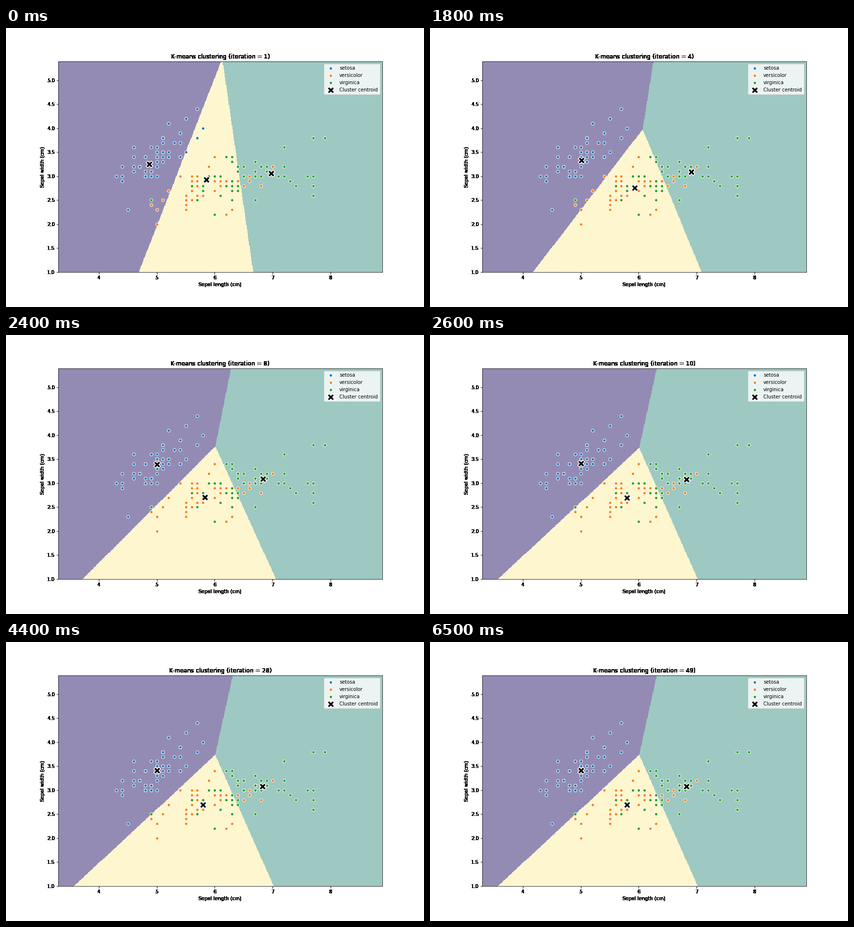
Recreate the animation shown at these times as a matplotlib script. Size 864x576 px, loop 6600 ms.

```python
import numpy as np
import matplotlib.pyplot as plt
from matplotlib.animation import FuncAnimation

# Flower measurements in tenths of a cm: sepal length -> sepal widths
SETOSA = {
    43: [30], 44: [29, 30, 32], 45: [23], 46: [31, 34, 36, 32], 47: [32, 32],
    48: [34, 30, 34, 31, 30], 49: [30, 31, 31, 36],
    50: [36, 34, 30, 34, 32, 35, 35, 33], 51: [35, 35, 38, 37, 33, 34, 38, 38],
    52: [35, 34, 41], 53: [37], 54: [39, 37, 39, 34, 34], 55: [42, 35],
    57: [44, 38], 58: [40],
}
VERSICOLOR = {
    49: [24], 50: [20, 23], 51: [25], 52: [27], 54: [30],
    55: [23, 24, 24, 25, 26], 56: [29, 30, 25, 30, 27],
    57: [28, 26, 30, 29, 28], 58: [27, 27, 26], 59: [30, 32],
    60: [22, 29, 27, 34], 61: [29, 28, 28, 30], 62: [22, 29],
    63: [33, 25, 23], 64: [32, 29], 65: [28], 66: [29, 30],
    67: [31, 30, 31], 68: [28], 69: [31], 70: [32],
}
VIRGINICA = {
    49: [25], 56: [28], 57: [25], 58: [27, 28, 27], 59: [30], 60: [22, 30],
    61: [30, 26], 62: [28, 34], 63: [33, 29, 27, 28, 34, 25],
    64: [27, 32, 28, 28, 31], 65: [30, 32, 30, 30], 67: [25, 33, 31, 33, 30],
    68: [30, 32], 69: [32, 31, 31], 71: [30], 72: [36, 32, 30], 73: [29],
    74: [28], 76: [30], 77: [38, 26, 28, 30], 79: [38],
}
START = np.array([[4.866, 3.250], [5.857, 2.9296], [6.977, 3.0638]])
REGION_COLORS = np.array([[148, 139, 181], [254, 246, 206], [157, 201, 194]],
                         dtype=np.uint8)
TICKS = 66
ITERATIONS = 49
STEP = 0.01


def to_points(table):
    return np.array([(x, y) for x, ys in table.items() for y in ys]) / 10


def nearest(x, y, centers):
    """Index of the closest center for each position."""
    return np.argmin([(x - cx) ** 2 + (y - cy) ** 2 for cx, cy in centers],
                     axis=0)


def run_kmeans(points, centers, count):
    history = [centers]
    for _ in range(count - 1):
        labels = nearest(points[:, 0], points[:, 1], history[-1])
        history.append(np.array([points[labels == k].mean(axis=0)
                                 for k in range(len(centers))]))
    return history


def iteration_at(tick):
    """The first iterations are held longer, then one per tick."""
    if tick >= 22:
        return tick - 16
    return 1 + sum(tick >= start for start in (10, 15, 18, 20))


def harden(img, dpi):
    """Turn every touched pixel solid black."""
    img[..., :3] = 0
    img[..., 3] = img[..., 3] > 0
    return img, 0, 0


species = {
    "setosa": to_points(SETOSA),
    "versicolor": to_points(VERSICOLOR),
    "virginica": to_points(VIRGINICA),
}
data = np.vstack(list(species.values()))
history = run_kmeans(data, START, ITERATIONS)

xs = 3.3 + STEP * np.arange(560)
ys = 1.0 + STEP * np.arange(440)
grid_x, grid_y = np.meshgrid(xs[:-1], ys[:-1])


def regions(centers):
    return REGION_COLORS[nearest(grid_x, grid_y, centers)]


fig = plt.figure(figsize=(12, 8), dpi=72, facecolor="white")
fig.subplots_adjust(left=0.125, right=0.9, bottom=0.125, top=0.88)
ax = fig.add_subplot()

background = ax.imshow(regions(START), origin="lower", aspect="auto",
                       interpolation="nearest",
                       extent=(xs[0], xs[-1], ys[0], ys[-1]))
for (name, pts), color in zip(species.items(), ("C0", "C1", "C2")):
    ax.scatter(*pts.T, s=36, color=color, edgecolors="white", linewidths=1,
               label=name, zorder=2)
crosses = ax.scatter(*START.T, s=200, marker="X", color="black",
                     edgecolors="white", linewidths=1.5,
                     label="Cluster centroid", zorder=2.2)

ax.set_xlim(xs[0], xs[-1])
ax.set_ylim(ys[0], ys[-1])
ax.set_xticks(range(4, 9))
ax.set_yticks(np.arange(1, 5.1, 0.5))
ax.set_xlabel("Sepal length (cm)")
ax.set_ylabel("Sepal width (cm)")
ax.legend(loc="upper right")
title = ax.set_title("")
for artist in (ax.xaxis, ax.yaxis, title):
    artist.set_agg_filter(harden)


def draw(tick):
    iteration = iteration_at(tick)
    centers = history[iteration - 1]
    background.set_data(regions(centers))
    crosses.set_offsets(centers)
    title.set_text(f"K-means clustering (iteration = {iteration})")
    return background, crosses, title


anim = FuncAnimation(fig, draw, frames=TICKS, interval=100, repeat=True,
                     repeat_delay=0)
plt.show()
```
